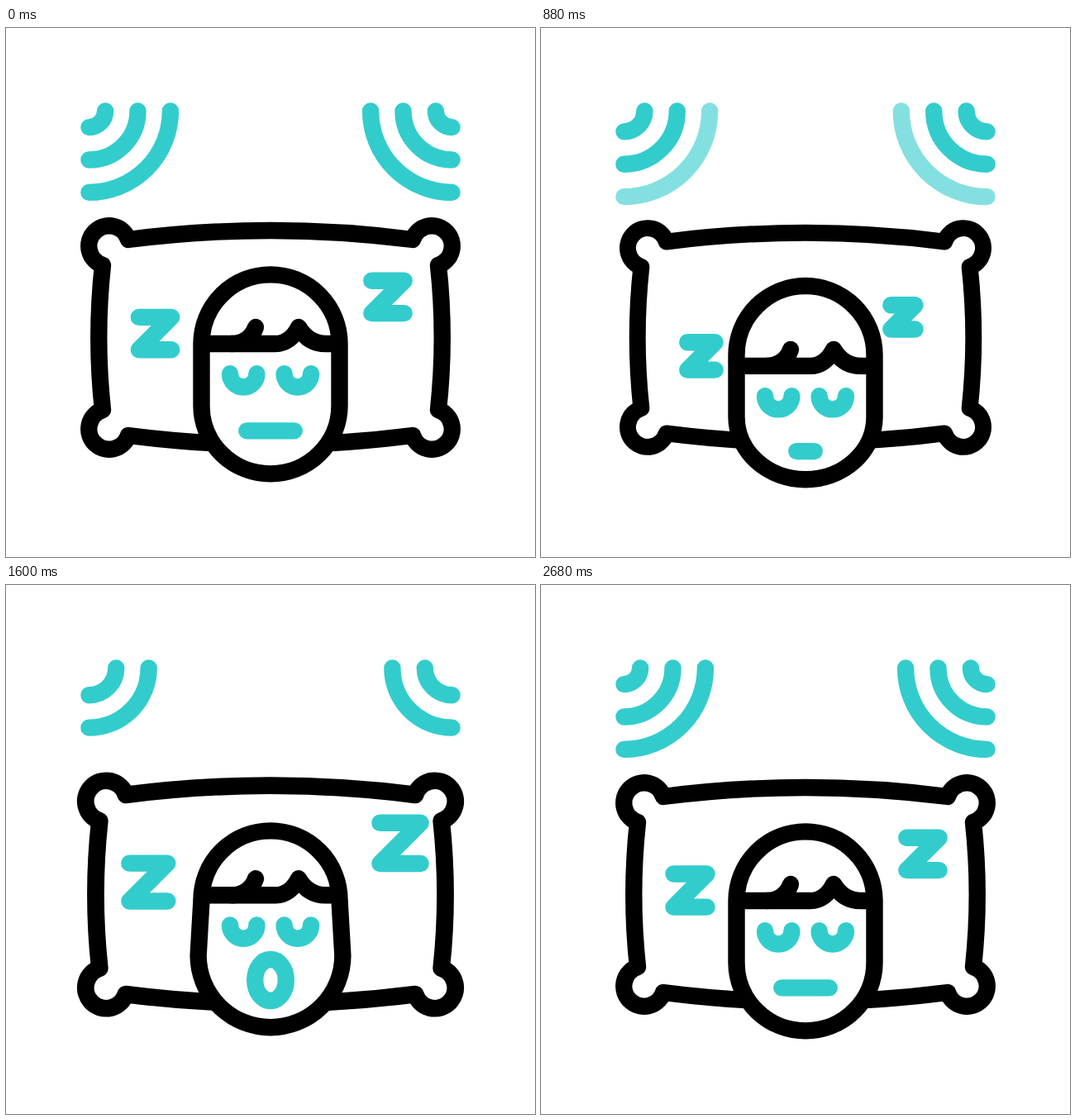
Write an HTML page that moves like this. It is 640 px wide and 640 px high and loops after 3 s.

```html
<!DOCTYPE html>
<html lang="en">
<head>
<meta charset="utf-8">
<title>Sleeper</title>
<style>
  html, body { margin: 0; width: 100%; height: 100%; overflow: hidden; background: #fff; }
  svg { display: block; width: 100%; height: 100%; }
  path { fill: none; stroke: #000; stroke-width: 20.4; stroke-linecap: round; stroke-linejoin: round; }
  .teal path, path.teal { stroke: #33cccc; }
  #head { fill: #fff; }
</style>
</head>
<body>
<svg viewBox="0 0 640 640">
  <g class="teal" id="waves"></g>
  <g class="teal" id="mirror" transform="translate(640 0) scale(-1 1)"></g>
  <path id="pillow" d="M148 256 Q320 234 492 256 A24.5 24.5 0 1 1 523 287 Q532.5 374.5 523 462
    A24.5 24.5 0 1 1 492 493 Q320 515 148 493 A24.5 24.5 0 1 1 117 462 Q107.5 374.5 117 287 A24.5 24.5 0 1 1 148 256Z"/>
  <path class="teal" id="zLeft"/>
  <path class="teal" id="zRight"/>
  <path id="head"/>
  <g id="face">
    <path d="M237 382H326C338 382 348 374 354 362C361 374 372 382 387 382H403"/>
    <path d="M273 382C287 382 298 374 302 362"/>
    <path class="teal" d="M271 418.3a16.2 16.2 0 0 0 32.4 0"/>
    <path class="teal" d="M336.6 418.3a16.2 16.2 0 0 0 32.4 0"/>
  </g>
  <path class="teal" id="mouth"/>
</svg>
<script>
const LOOP = 3000, STEP = 20;
const START = 200, END = 2600, CYCLE = 600, GAP = 39.4;
const $ = id => document.getElementById(id);
const clamp = u => Math.min(1, Math.max(0, u));

// Smooth 0 to 1 between two times
function ramp(t, from, to) {
  const u = clamp((t - from) / (to - from));
  return u * u * (3 - 2 * u);
}

// One breath: rest, to low, over to high, back to rest
function swing(t, low, high, start, down, up, back) {
  const a = start + down, b = a + up;
  return low * ramp(t, start, a) + (high - low) * ramp(t, a, b) - high * ramp(t, b, b + back);
}
const nod = (t, low, high, delay = 0) => swing(t, low, high, START + delay, 750, 1000, 650);
const drift = (t, low, high, delay) => swing(t, low, high, START + delay, 600, 800, 800);
const grow = (t, low, high, delay) => swing(t, low, high, START + delay, 700, 880, 800);

const sets = ['waves', 'mirror'].map(id => Array.from({ length: 4 }, () => {
  const p = document.createElementNS('http://www.w3.org/2000/svg', 'path');
  $(id).appendChild(p);
  return p;
}));

function arc(i, c, r, alpha) {
  for (const set of sets) {
    set[i].setAttribute('d', `M${c + r} ${c}A${r} ${r} 0 0 1 ${c} ${c + r}`);
    set[i].setAttribute('opacity', alpha);
  }
}

// Arcs move out by one gap per cycle; a new one is born, the last fades
function drawWaves(t) {
  const tau = t > START && t < END ? (t - START) % CYCLE : 0;
  const born = clamp((tau - 200) / 400);
  arc(0, 93 + 7.4 * born, 7 + 12.7 * born, clamp((tau - 200) / 150));
  for (let i = 0; i < 3; i++) {
    const r = GAP * (0.5 + i + tau / CYCLE);
    arc(i + 1, 100.4, r, i < 2 ? 1 : clamp(1 - tau / 200));
  }
}

function drawZ(id, x, y, h) {
  $(id).setAttribute('d', `M${x - h} ${y - h}H${x + h}L${x - h} ${y + h}H${x + h}`);
}

function drawLetters(t) {
  drawZ('zLeft', 180.5 + drift(t, 15, -12.5, 200), 369.6 + drift(t, 30.5, -17.5, 200),
    19.7 + grow(t, -3.9, 8, 200));
  drawZ('zRight', 462 + drift(t, -25.2, 15, 0), 325.4 + drift(t, 25.5, -13, 0),
    19.7 + grow(t, -5.1, 6.1, 0));
}

function drawHead(t) {
  const r = 83.5, R = r + nod(t, 0, 5.4);
  const brow = 298.4 + r + nod(t, 15, -10.9, 70);
  const jaw = 457 + nod(t, 13.8, -17.5);
  const chin = 539.4 + nod(t, 7.5, -11.4, 70);
  $('head').setAttribute('d', `M${320 - r} ${brow}A${r} ${r} 0 0 1 ${320 + r} ${brow}`
    + `L${320 + R} ${jaw}A${R} ${chin - jaw} 0 0 1 ${320 - R} ${jaw}Z`);
  $('face').setAttribute('transform', `translate(0 ${nod(t, 27.6, -20.2)})`);
}

// A line that narrows, opens to an oval and closes again
function drawMouth(t) {
  const y = 487.4 + nod(t, 25.3, -23);
  const shut = 1 - clamp(Math.min(t - 930, 2290 - t) / 660);
  const narrow = ramp(t, START, 930) - ramp(t, 2290, 2640);
  const rx = 28.7 - 18.2 * narrow + 8.3 * (1 - shut ** 1.4);
  const ry = 25 * (1 - shut ** 3);
  $('mouth').setAttribute('d', ry
    ? `M${320 - rx} ${y}a${rx} ${ry} 0 0 1 ${2 * rx} 0a${rx} ${ry} 0 0 1 ${-2 * rx} 0Z`
    : `M${320 - rx} ${y}h${2 * rx}`);
}

function draw(t) {
  const k = 1 + swing(t, -0.0215, 0.02, START, 700, 800, 940);
  $('pillow').setAttribute('transform', `translate(320 374.5) scale(${k}) translate(-320 -374.5)`);
  drawWaves(t);
  drawLetters(t);
  drawHead(t);
  drawMouth(t);
}

const begin = performance.now();
function tick() {
  const t = (performance.now() - begin) % LOOP;
  draw(Math.floor(t / STEP) * STEP);
  requestAnimationFrame(tick);
}
tick();
</script>
</body>
</html>
```
